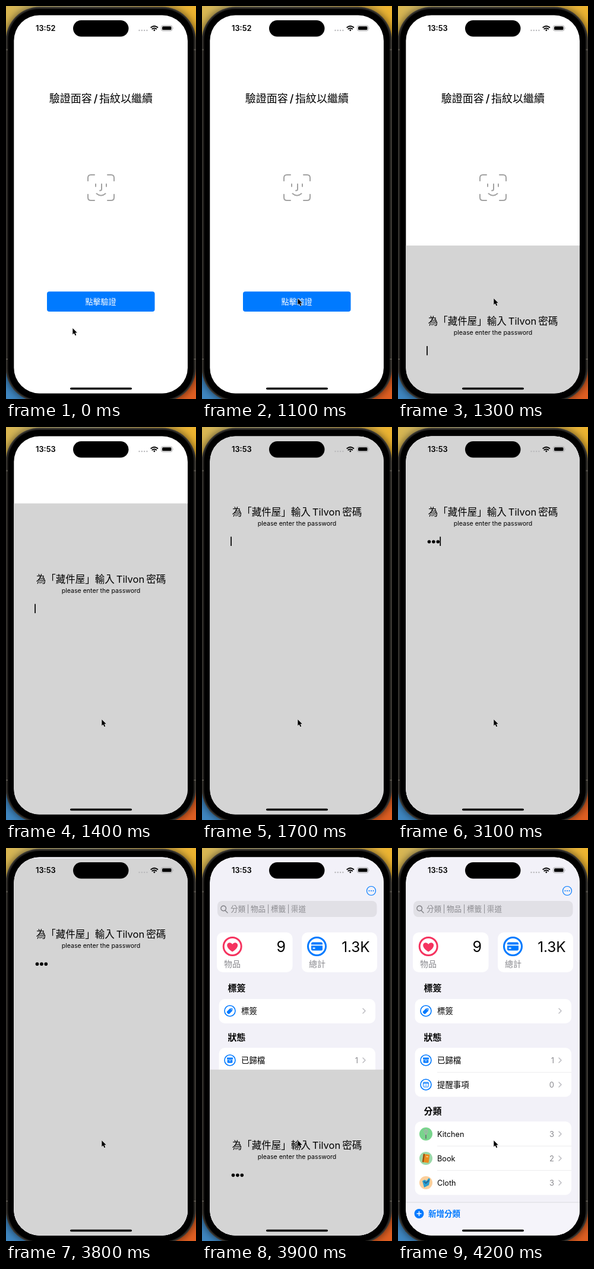
Animation of 320x661 px, one loop 4.3 s. Source, as an HTML page:

```html
<!DOCTYPE html>
<html lang="zh-Hant">
<head>
<meta charset="utf-8">
<style>
  html, body { margin: 0; width: 100%; height: 100%; overflow: hidden; }
  svg { display: block; width: 100%; height: 100%; }
  text { font-family: Inter, "Noto Sans CJK TC", "Noto Sans CJK", sans-serif; white-space: pre; }
  .mid { text-anchor: middle; }
  .end { text-anchor: end; }
  .line { fill: none; stroke-linecap: round; stroke-linejoin: round; }
  .blue { fill: #007aff; }
  .ring { fill: none; stroke: #007aff; stroke-width: 1.6; }
  .grey { fill: #8a8a8f; }
  .head { font-size: 15px; font-weight: 700; }
  .shadow { filter: blur(7px); opacity: .6; }
</style>
</head>
<body>
<svg viewBox="0 0 320 661">
  <defs>
    <linearGradient id="sky">
      <stop offset="0" stop-color="#d9b650"/>
      <stop offset=".4" stop-color="#c3c09a"/>
      <stop offset="1" stop-color="#edb32e"/>
    </linearGradient>
    <linearGradient id="ground">
      <stop offset=".1" stop-color="#3f86c0"/>
      <stop offset=".9" stop-color="#df5f22"/>
    </linearGradient>
    <clipPath id="screen"><rect x="13.300" y="15.400" width="292.700" height="636" rx="43"/></clipPath>
  </defs>

  <rect width="320" height="330" fill="url(#sky)"/>
  <rect y="330" width="320" height="331" fill="url(#ground)"/>
  <rect class="shadow" x="-1" y="2" width="322" height="663" rx="57"/>
  <rect x="-.5" y="1.500" width="320.500" height="664" rx="57" fill="#3b3833"/>
  <rect x="1.200" y="3.200" width="317" height="660.500" rx="55" fill="#24221f"/>
  <rect x="3.500" y="5" width="312.500" height="657" rx="52"/>
  <path d="M0 73.500h3M316.500 73.500h3.500M0 594h3M316.500 594h3.500" stroke="#55514b" stroke-width="2"/>

  <g clip-path="url(#screen)">
    <g id="lock">
      <rect x="13" y="15" width="294" height="637" fill="#fff"/>
      <text class="mid" x="160" y="162.300" font-size="18" font-weight="500" word-spacing="-2">驗證面容 / 指紋以繼續</text>
      <g class="line" stroke="#a2a2a2" stroke-width="2">
        <path d="M138 294v-5q0-5 5-5h6M171 284h6q5 0 5 5v5M182 317v5q0 5-5 5h-6M149 327h-6q-5 0-5-5v-5"/>
        <path d="M151 299.500v4M169 299.500v4M161 299.500v8.500q0 2.500-3 2.500M152.500 315.500q7.500 6.500 15 0"/>
      </g>
      <g id="button">
        <rect class="blue" x="69" y="480.300" width="181.500" height="33.700" rx="4"/>
        <text class="mid" x="159.500" y="502" font-size="13" fill="#fff">點擊驗證</text>
      </g>
    </g>

    <g id="app"></g>

    <g id="sheet">
      <rect x="13" y="15.400" width="294" height="640" fill="#d4d4d4"/>
      <text class="mid" x="160" y="149" font-size="16.500">為「藏件屋」輸入&#8201;Tilvon&#8201;密碼</text>
      <text class="mid" x="160" y="165.700" font-size="10.600">please enter the password</text>
      <g id="dots"></g>
      <rect id="caret" x="48.200" y="184.500" width="1.700" height="15.500"/>
    </g>
  </g>

  <!-- status bar -->
  <text id="clock" x="50" y="42" font-size="12.800" font-weight="600"></text>
  <rect x="113" y="24" width="93.500" height="27.500" rx="13.700"/>
  <path class="line" d="M224.500 41h13" stroke="#b9b9bc" stroke-width="2.400" stroke-dasharray="0 4.300"/>
  <g class="line" stroke="#000" stroke-width="1.900">
    <path d="M244.300 36q5.500-4.600 11 0M246.400 38.600q3.400-2.800 6.800 0"/>
    <circle cx="249.800" cy="40.700" r=".5"/>
  </g>
  <rect x="261.500" y="32.800" width="18.500" height="9" rx="2.800" fill="none" stroke="#a8a8aa"/>
  <rect x="263" y="34.300" width="15.500" height="6" rx="1.500"/>
  <path d="M281.300 35.700q1.500 1.500 0 3z" fill="#a8a8aa"/>
  <rect x="108" y="641.700" width="104" height="3.600" rx="1.800"/>

  <path id="cursor" d="M0 0v10.500l2.400-2.200 1.800 4 1.800-.8-1.800-3.900h3.300z" stroke="#fff" stroke-width="1" paint-order="stroke"/>
</svg>

<script>
const $ = id => document.getElementById(id);

const panel = (x, y, w, h) => `<rect x="${x}" y="${y}" width="${w}" height="${h}" rx="10" fill="#fff"/>`;
const label = (x, y, size, text, attrs = '') => `<text x="${x}" y="${y}" font-size="${size}" ${attrs}>${text}</text>`;
const header = (y, text) => `<text class="head" x="43.500" y="${y}">${text}</text>`;
const divider = y => `<path d="M66 ${y}h226" stroke="#e6e6ea" stroke-width=".8"/>`;
const row = (y, size, icon, text, count = '') =>
  `<g transform="translate(47 ${y})">${icon}</g>` +
  label(66, y + 4.8, size, text) +
  label(263, y + 4.8, 13, count, 'class="grey end"') +
  `<path class="line" d="M271 ${y - 4}l4 4-4 4" stroke="#bcbcc1" stroke-width="1.500"/>`;
const ringed = shape => `<circle class="ring" r="9"/>${shape}`;
const badge = (color, shape) => `<circle r="11" fill="${color}"/>${shape}`;

const tag = ringed('<path class="blue" d="M-5 1l5-5 4.500-.5-.5 4.500-5 5q-1 .7-2 0l-2-2q-.7-1 0-2z"/><circle cx="2.300" cy="-2.300" r=".8" fill="#fff"/>');
const box = ringed('<path class="blue" d="M-5-4.500h10v3h-10zM-4.300-.8h8.600v4.300q0 1-1 1h-6.600q-1 0-1-1z"/><path d="M-1.800 1h3.600" stroke="#fff"/>');
const calendar = ringed('<rect x="-4.500" y="-4" width="9" height="8" rx="1.500" fill="none" stroke="#007aff"/><path d="M-4.500-2.500h9" stroke="#007aff" stroke-width="1.500"/><path d="M-2.500.2h5M-2.500 2h5" stroke="#007aff" stroke-width=".9" stroke-dasharray="1 1"/>');
const whisk = badge('#78d48c', '<path d="M0 1v7" stroke="#6f7b76" stroke-width="2"/><path class="line" d="M0 1q-6-6 0-9 6 3 0 9v-9" stroke="#a7b2ac" stroke-width="1.200"/>');
const book = badge('#9bd8a8', '<g transform="rotate(8)"><rect x="-5.500" y="-7" width="11" height="14" rx="1" fill="#e98a1c"/><path d="M-4-7v14" stroke="#8b4a16" stroke-width="2"/><path d="M0-3h3.500" stroke="#ffd9a0" stroke-width="1.500"/></g>');
const cloth = badge('#fccf9b', '<path d="M-6-3l4-2 3 2 4-5 2 2-2 10-8 4z" fill="#2b9fd0"/><path d="M-3-2l3 3 5-5" fill="none" stroke="#245a86" stroke-width="1.500"/>');

$('app').innerHTML =
  '<rect x="13" y="15" width="294" height="637" fill="#f2f1f8"/>' +
  '<circle class="ring" cx="285" cy="72" r="7.500" style="stroke-width:1.200"/>' +
  '<path class="line" d="M281.500 72h8" stroke="#007aff" stroke-width="2" stroke-dasharray="0 3.500"/>' +
  '<rect x="26" y="89" width="268.500" height="27" rx="8" fill="#e1e0e6"/>' +
  '<path class="line" d="M39.500 105.500l3.500 3.500M40.500 101.500a4.300 4.300 0 1 0-8.600 0 4.300 4.300 0 1 0 8.600 0" stroke="#808086" stroke-width="1.400"/>' +
  label(48, 107.3, 12.6, '分類|物品|標籤|渠道'.replaceAll('|', '\u2009|\u2009'), 'class="grey"') +
  panel(25, 142, 127.5, 67) + panel(168, 142, 127, 67) +
  '<circle cx="51.200" cy="165.500" r="15" fill="none" stroke="#f5335f" stroke-width="3"/>' +
  '<path transform="translate(51.200 166.500)" d="M0 8C-3 6-9 2-9-3-9-8-2.500-9 0-4.500 2.500-9 9-8 9-3 9 2 3 6 0 8z" fill="#f5335f"/>' +
  '<circle class="ring" cx="193.500" cy="165.500" r="15" style="stroke-width:3"/>' +
  '<rect class="blue" x="184" y="158.500" width="19" height="14" rx="2.500"/>' +
  '<path d="M184 163.300h19M186.500 168.500h4" stroke="#fff" stroke-width="1.800"/>' +
  label(141, 174.5, 25, '9', 'class="end"') +
  label(282.7, 174.5, 24.3, '1.3K', 'class="end"') +
  label(37, 199.8, 14, '物品', 'class="grey"') +
  label(180, 199.8, 14, '總計', 'class="grey"') +
  header(241.2, '標簽') + panel(28.5, 254, 263.5, 41) +
  row(274, 13.4, tag, '標簽') +
  header(324.2, '狀態') + panel(28.5, 336, 263.5, 82.5) + divider(377.3) +
  row(357, 13.4, box, '已歸檔', 1) +
  row(398, 13.4, calendar, '提醒事項', 0) +
  header(448, '分類') + panel(28.5, 460, 263.5, 123.5) + divider(501.3) + divider(542.3) +
  row(481, 12.7, whisk, 'Kitchen', 3) +
  row(522, 12.7, book, 'Book', 2) +
  row(563, 12.7, cloth, 'Cloth', 3) +
  '<rect x="13" y="596" width="294" height="56" fill="#f5f4fa"/>' +
  '<path d="M13 596h294" stroke="#d3d3d8" stroke-width=".8"/>' +
  '<circle class="blue" cx="35.500" cy="615" r="8"/>' +
  '<path d="M31.500 615h8M35.500 611v8" stroke="#fff" stroke-width="1.500"/>' +
  label(51, 620, 13.5, '新增分類', 'class="blue" font-weight="700"');

$('dots').innerHTML = [0, 1, 2].map(i => `<circle cx="${52.5 + 7.4 * i}" cy="193" r="2.800"/>`).join('');

const LOOP = 4300, STEP = 100, TRAVEL = 636;
const KEYS = [2700, 2900, 3100];
const clamp = v => Math.min(1, Math.max(0, v));
const ramp = (t, from, to) => clamp((t - from) / (to - from));

// Critically damped spring: share of the way still to go.
function spring(t, start) {
  const x = Math.max(0, t - start) * .018;
  const rest = (1 + x) * Math.exp(-x);
  return rest < .007 ? 0 : rest;
}

function draw(t) {
  const move = ramp(t, 100, 500), ease = move * move * (3 - 2 * move);
  $('cursor').setAttribute('transform', `translate(${112.3 + 49 * ease} ${542 - 50 * ease})`);

  $('button').setAttribute('opacity', 1 - .25 * Math.sin(Math.PI * ramp(t, 600, 1100)));
  $('clock').textContent = t < 1300 ? '13:52' : '13:53';
  $('app').style.display = t < 2000 ? 'none' : '';

  const away = t < 2000 ? spring(t, 1225) : 1 - spring(t, 3795.3);
  $('sheet').setAttribute('transform', `translate(0 ${TRAVEL * away})`);

  const typed = KEYS.filter(k => t >= k).length;
  [...$('dots').children].forEach((dot, i) => dot.style.display = i < typed ? '' : 'none');
  $('caret').setAttribute('x', 48.2 + 7.4 * typed);
  $('caret').setAttribute('opacity',
    1 - ramp(t, 2100, 2400) + ramp(t, 2500, 2700) - ramp(t, 3500, 3700));
}

const begin = performance.now();
function tick() {
  const t = (performance.now() - begin) % LOOP;
  draw(Math.floor(t / STEP) * STEP);
  requestAnimationFrame(tick);
}
tick();
</script>
</body>
</html>
```
